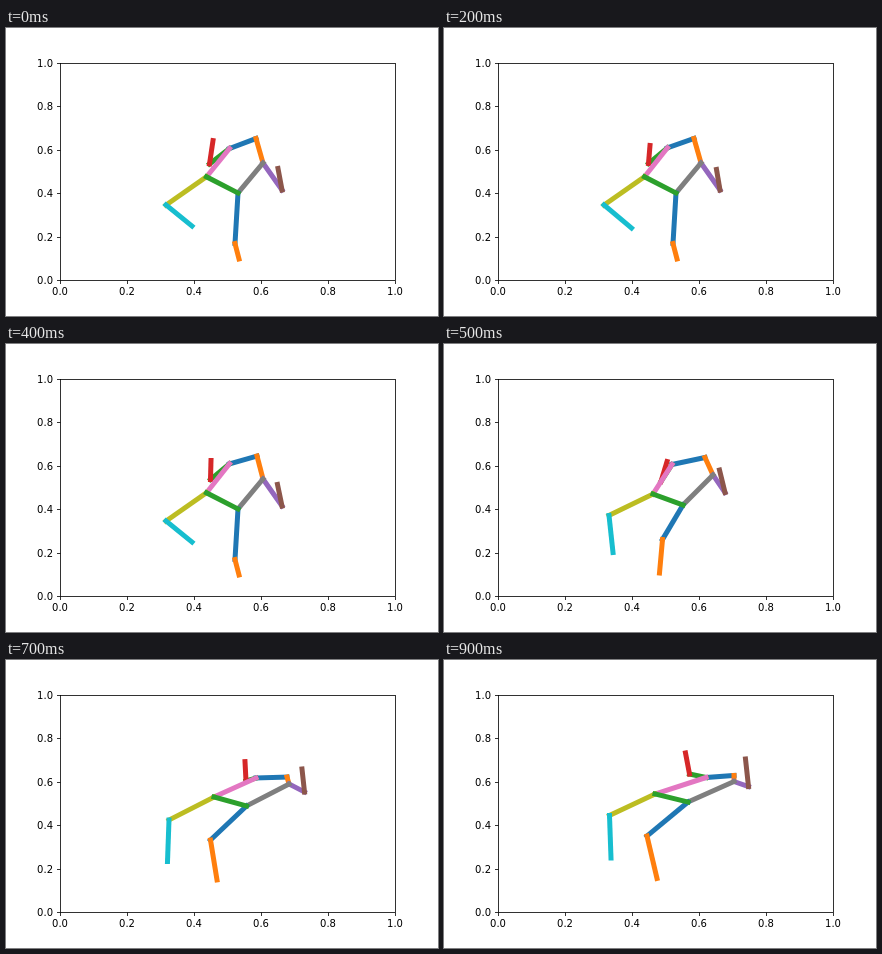
Recreate the animation shown at these times as an HTML page with a canvas. Size 432 by 288 pixels, loop 1 s.

```html
<!DOCTYPE html>
<html lang="en">
<head>
<meta charset="utf-8">
<title>Stick figure plot</title>
<style>
html, body { margin: 0; width: 100%; height: 100%; overflow: hidden; background: #fff; }
canvas { display: block; }
</style>
</head>
<body>
<canvas id="plot" width="432" height="288"></canvas>
<script>
const ctx = document.getElementById('plot').getContext('2d');
const STEP = 100, STEPS = 10;

// Tableau cycle, in drawing order of the limbs
const COLORS = ['#1f77b4', '#ff7f0e', '#2ca02c', '#d62728', '#9467bd',
                '#8c564b', '#e377c2', '#7f7f7f', '#bcbd22', '#17becf'];
const LIMBS = ['AB', 'BC', 'AD', 'DE', 'CF', 'FG', 'AH', 'CK', 'HL', 'LM', 'KN', 'NO', 'HK'];

const rest = {
  A: [223.5, 120.5], B: [250, 110.5], C: [257, 135], D: [203.5, 136], E: [207, 112.5],
  F: [276, 162], G: [272, 140.5], H: [200.5, 148.8], K: [232, 165], L: [160, 177],
  M: [186, 198], N: [229, 215.5], O: [233, 231]
};
const sway = { ...rest, A: [223.5, 119.8], D: [204.5, 135.5], E: [206, 117.5], G: [272.5, 141.5], M: [187.5, 200] };
const hold = { ...sway, B: [251, 112], E: [205, 116.5], G: [271.5, 140.5], M: [186, 198] };

// Poses by step; missing steps are interpolated
const poses = {
  0: rest,
  2: sway,
  4: hold,
  5: {
    A: [228, 120.5], B: [261, 113.5], C: [269, 131], D: [217, 137.5], E: [223, 117.5],
    F: [281, 148.5], G: [275.5, 126], H: [209, 150], K: [239, 161], L: [165, 171.5],
    M: [169, 208.5], N: [218.5, 195.5], O: [215.5, 229]
  },
  6: {
    A: [239, 118], B: [269.5, 116.5], C: [274, 127], D: [233.5, 128], E: [234.5, 108],
    F: [290, 137], G: [286.5, 115.5], H: [206, 142], K: [238, 152], L: [161.5, 166.5],
    M: [160, 205], N: [210, 186], O: [212, 223]
  },
  7: {
    A: [250, 118], B: [281, 117], C: [283, 124], D: [240, 121], E: [239, 101.5],
    F: [298.5, 132], G: [296, 109], H: [208, 137], K: [240.5, 146], L: [163, 160],
    M: [161.5, 201.5], N: [204.5, 180], O: [211, 220]
  },
  9: {
    A: [262, 117.5], B: [290, 115.5], C: [290, 121.5], D: [245.5, 114], E: [241.5, 93],
    F: [304.5, 126.5], G: [301.5, 99], H: [211, 134], K: [244, 142], L: [165.5, 155.5],
    M: [167, 198], N: [203, 176], O: [213, 218.5]
  }
};

function poseAt(step) {
  if (poses[step]) return poses[step];
  const a = poses[step - 1], b = poses[step + 1], mid = {};
  for (const j in a) mid[j] = a[j].map((v, i) => (v + b[j][i]) / 2);
  return mid;
}

function line(x1, y1, x2, y2) {
  ctx.beginPath();
  ctx.moveTo(x1, y1);
  ctx.lineTo(x2, y2);
  ctx.stroke();
}

function drawAxes() {
  ctx.strokeStyle = ctx.fillStyle = '#000';
  ctx.lineWidth = 0.8;
  ctx.lineCap = 'butt';
  ctx.font = '10px "DejaVu Sans", sans-serif';
  ctx.textBaseline = 'alphabetic';
  ctx.strokeRect(54.5, 35.5, 335, 217);
  for (let i = 0; i <= 5; i++) {
    const label = (i / 5).toFixed(1);
    const x = Math.round(54 + 66.96 * i) + 0.5;
    const y = Math.round(252 - 43.488 * i) + 0.5;
    line(x, 252.5, x, 256);
    line(51, y, 54.5, y);
    ctx.textAlign = 'center';
    ctx.fillText(label, x - 0.5, 267);
    ctx.textAlign = 'right';
    ctx.fillText(label, 47, y + 3.5);
  }
}

function drawFigure(pose) {
  ctx.lineWidth = 5;
  ctx.lineCap = 'square';
  LIMBS.forEach(([from, to], i) => {
    ctx.strokeStyle = COLORS[i % COLORS.length];
    line(...pose[from], ...pose[to]);
  });
}

function render(now) {
  const step = Math.floor(now / STEP) % STEPS;
  ctx.fillStyle = '#fff';
  ctx.fillRect(0, 0, 432, 288);
  drawFigure(poseAt(step));
  drawAxes();
}

let start;
function tick(now) {
  start ??= now;
  render(now - start);
  requestAnimationFrame(tick);
}
render(0);
requestAnimationFrame(tick);
</script>
</body>
</html>
```
